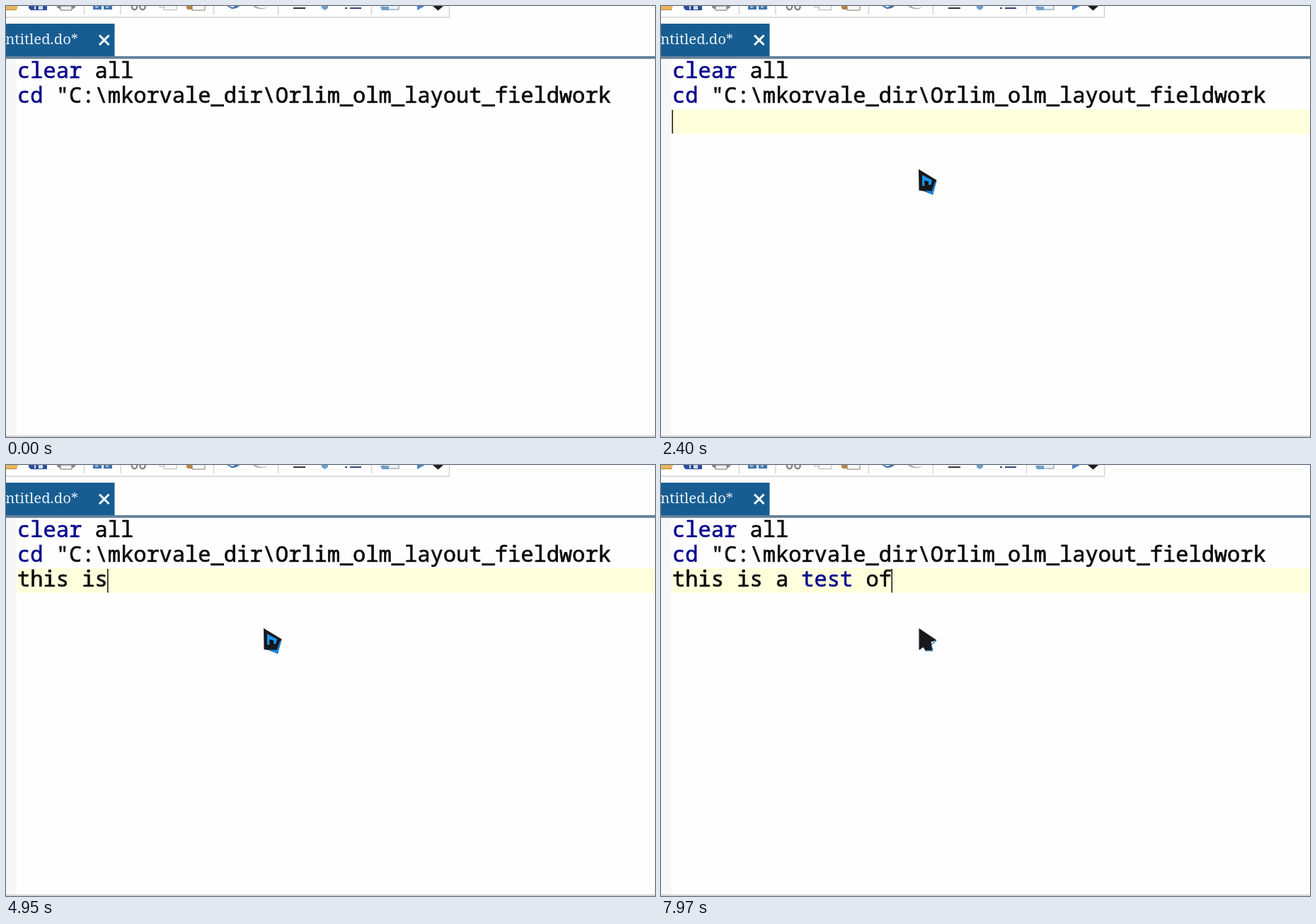
Recreate the animation shown at these times as an HTML page. Size 917 px wide and 610 px high, loop 8000 ms.

```html
<!DOCTYPE html>
<html lang="en">
<head>
<meta charset="utf-8">
<title>Code editor</title>
<style>
  html, body { margin: 0; width: 100%; height: 100%; overflow: hidden; background: #fefefe; }
  svg { display: block; width: 917px; height: 610px; }
  .code text { font: 500 30.4px "Noto Sans Mono", "DejaVu Sans Mono", monospace; white-space: pre;
    fill: #0a0a0a; stroke: #0a0a0a; stroke-width: .65px; }
  .code .key { fill: #0c0c8e; stroke: #0c0c8e; }
  .tab { font: 20.3px "Noto Serif", "Liberation Serif", serif; fill: #e6eff6; }
</style>
</head>
<body>
<svg viewBox="0 0 917 610" xmlns="http://www.w3.org/2000/svg">
  <rect width="917" height="610" fill="#fefefe"/>

  <g id="toolbar">
    <path d="M0 16H626.5V0M110.500 0V12M162 0V12M293.500 0V12M384.500 0V12M516.500 0V12" fill="none" stroke="#d2d2d2" stroke-width="1.400"/>
    <path d="M0 0H17L15 6H0Z" fill="#e8b65c"/>
    <path d="M0 5.500H15" stroke="#b98a3a"/>
    <path d="M32 0H58V6H35L32 3Z" fill="#2d4f9c"/>
    <path d="M40 0H52V5H40Z" fill="#d5dcec"/>
    <path d="M42 0H46V5H42Z" fill="#2d4f9c"/>
    <path d="M72 0H98V2L95 4H75L72 2Z" fill="#8c8c8c"/>
    <path d="M77 0H93V6H77Z" fill="#f2f2f2" stroke="#777"/>
    <path d="M123 0H135V5H123ZM138 0H150V5H138Z" fill="#3f74ad"/>
    <path d="M126 0H130V3H126ZM141 0H145V3H141Z" fill="#8fb6dc"/>
    <g fill="none" stroke="#858585" stroke-width="2.500">
      <ellipse cx="181.500" cy="1" rx="3.600" ry="4.200"/>
      <ellipse cx="193" cy="1" rx="3.600" ry="4.200"/>
    </g>
    <path d="M217 -2V2H224M223 -2V5.500H241V-2" fill="#fafafa" stroke="#b5b5b5"/>
    <path d="M255 0H268V5H257L255 3Z" fill="#b98445"/>
    <path d="M263 -2V6H281V-2" fill="#f8f8f8" stroke="#8c7a66"/>
    <path d="M312 0H315L320 2L324 0H330Q326 4 319 4Z" fill="#3f6fae"/>
    <path d="M370 1L365 4Q352 5 349 0H353Q357 3 364 3Z" fill="#b0b0b0"/>
    <path d="M406 3H423" stroke="#333" stroke-width="2"/>
    <path d="M446 0H455V3L450.500 6L446 3Z" fill="#6d9fd0"/>
    <path d="M479 3H482M486 3H502" stroke="#34457a" stroke-width="2.200"/>
    <path d="M533 -2V5H555V-2" fill="#eef3f8" stroke="#71899f"/>
    <path d="M529 1H541V6H531Z" fill="#6f9fc6"/>
    <path d="M581 -5H601L581 6Z" fill="#4a86c8"/>
    <path d="M603 0H618L610.500 6.500Z" fill="#1c1c1c"/>
  </g>

  <rect y="25" width="153.500" height="47" fill="#175d92"/>
  <text class="tab" x="102" y="54" text-anchor="end">Untitled.do*</text>
  <path d="M132 41.500L145.500 55M145.500 41.500L132 55" stroke="#fff" stroke-width="3"/>
  <rect y="71" width="917" height="3.800" fill="#64809b"/>

  <rect y="75" width="14.500" height="533" fill="#f7f7f7"/>
  <path d="M0 608.800H917" stroke="#c6c6c6" stroke-width="1.600"/>
  <rect id="line" x="15.500" y="146" width="902" height="35" fill="#ffffdc"/>

  <g class="code">
    <text x="16" y="102"><tspan class="key">clear</tspan> all</text>
    <text x="16" y="137"><tspan class="key">cd</tspan> "C:\mkorvale_dir\Orlim_olm_layout_fieldwork</text>
    <text x="16" y="172"><tspan id="plain"></tspan><tspan id="word" class="key"></tspan><tspan id="rest"></tspan></text>
  </g>
  <rect id="caret" y="147" width="1.500" height="33.500" fill="#111"/>

  <g id="pointer">
    <path id="arrow" fill="#17191c"/>
    <g id="panel">
      <path d="M5 8L19 15.500L17.500 22H14V17.500L8.500 16V23.500H5Z" fill="#1b93ee"/>
      <path d="M8.500 16L14 17.500V22H8.500Z" fill="#0b1219"/>
      <path d="M7 30L18.500 31L23.500 17.500L25 18L20 36.500Z" fill="#1687e2"/>
    </g>
    <path id="edge" d="M9 31.800H19.500L18 23L25 17.500" fill="none" stroke="#1d6fc0" stroke-width="1.200"/>
    <path id="beam" d="M8.500 11.500L13 13M10.700 12.500V24M8.500 23.500L13 24.500" fill="none" stroke="#27a9c6" stroke-width="1.400"/>
  </g>
</svg>

<script>
const LOOP = 8000, ADVANCE = 18.24, LEFT = 16;
const CLICK = 880, BLINK = 530;
const TEXT = "this is a test of";
const WORD = [10, 14];
const KEYS = [2780, 3040, 4100, 4250, 4400, 4710, 4880, 5100, 5250, 5560,
              5970, 6200, 6380, 6680, 6960, 7750, 7900];

// Each spin of the pointer: one long pose, eight short ones, the last held.
const SPINS = [-130, 720, 1560, 2400, 3250, 4100, 4950, 5820, 6680, 7520];
const HOLD = 150, STEP = 74;
const OPEN = [1, 1, .8, .55, .28, 0, 0, 0, 0];
const ARROW = "M0.500 0L25.500 17L17.500 19.500L20 31L10 32L6.500 27L0.500 31Z";
const SHEET = "M0 0L25.500 15.500L20 36L7 31L0.500 30Z";

// Time, x and y of the pointer while it enters.
const PATH = [[110, 888, 547], [190], [340, 858, 190], [410, 640, 212],
              [490, 424, 235], [560, 364, 231]];

const $ = id => document.getElementById(id);
const show = (node, on) => node.setAttribute("visibility", on ? "visible" : "hidden");

function drawText(t) {
  const count = KEYS.filter(k => k <= t).length;
  const typed = TEXT.slice(0, count);
  // A command is recognised from its second letter on.
  const split = count >= WORD[0] + 2 ? WORD[0] : count;
  $("plain").textContent = typed.slice(0, split);
  $("word").textContent = typed.slice(split, WORD[1]);
  $("rest").textContent = split < count ? typed.slice(WORD[1]) : "";

  const active = t >= CLICK;
  const since = t - (count ? KEYS[count - 1] : CLICK);
  show($("line"), active);
  show($("caret"), active && since % (2 * BLINK) < BLINK);
  $("caret").setAttribute("x", LEFT + count * ADVANCE - .6);
}

function drawPointer(t) {
  const spot = PATH.filter(p => p[0] <= t).pop();
  const visible = !!spot && spot.length > 1;
  $("pointer").setAttribute("display", visible ? "inline" : "none");
  if (!visible) return;
  $("pointer").setAttribute("transform", `translate(${spot[1]} ${spot[2]})`);

  const u = t - SPINS.filter(s => s <= t).pop();
  const pose = u < HOLD ? 0 : Math.min(8, 1 + Math.floor((u - HOLD) / STEP));
  const open = OPEN[pose];
  $("arrow").setAttribute("d", open > .5 ? SHEET : ARROW);
  show($("panel"), open > 0);
  $("panel").setAttribute("transform", `translate(${12 * (1 - open)} ${18 * (1 - open)}) scale(${open})`);
  show($("edge"), pose === 5);
  show($("beam"), pose >= 7);
  $("beam").setAttribute("opacity", pose === 7 ? .4 : 1);
}

function frame() {
  const t = performance.now() % LOOP;
  drawText(t);
  drawPointer(t);
  requestAnimationFrame(frame);
}
frame();
</script>
</body>
</html>
```
